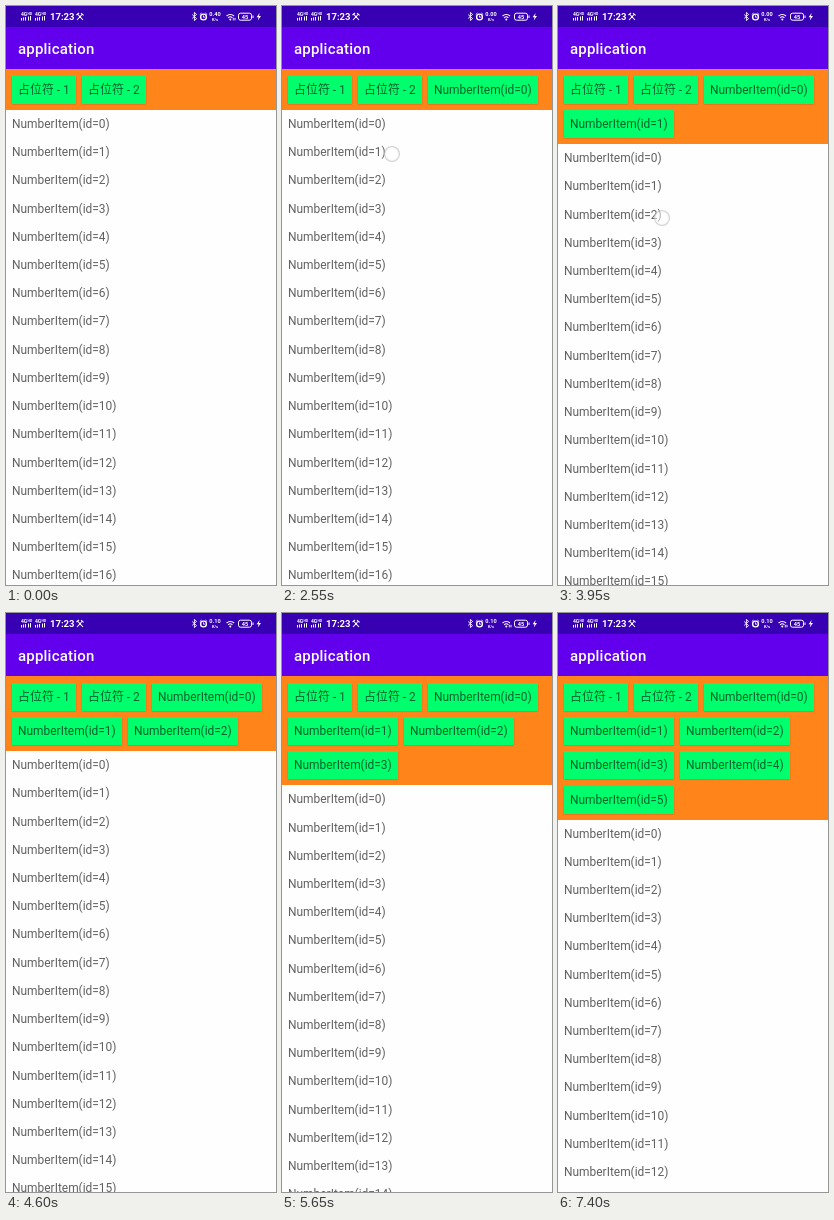
An HTML page that plays this animation: 270x579 px, repeating every 8 s.

```html
<!DOCTYPE html>
<html lang="zh-CN">
<head>
<meta charset="utf-8">
<title>application</title>
<style>
html, body { margin: 0; width: 100%; height: 100%; overflow: hidden; }
#stage {
  position: relative; width: 270px; height: 579px; overflow: hidden;
  background: #ff851b; color: rgba(0, 0, 0, .62);
  font: 11.94px Roboto, "Noto Sans CJK SC", "Noto Sans CJK", sans-serif;
  white-space: nowrap;
}
#status { position: absolute; left: 0; top: 0; }
#bar {
  position: absolute; top: 21px; width: 258px; height: 42.3px; padding-left: 12px;
  background: #6200ee; color: #fff;
  font-size: 15px; font-weight: 500; line-height: 45px; letter-spacing: .0125em;
}
.tag {
  position: absolute; height: 28px; line-height: 28.2px; padding: 0 6px;
  background: #00ff6c; box-shadow: 0 .5px 1.5px rgba(0, 0, 0, .25);
}
#list {
  position: absolute; width: 264px; height: 500px; padding-left: 6px;
  background: #fefefe;
}
#list div { height: 28.23px; line-height: 28.6px; }
.touch {
  position: absolute; width: 14px; height: 14px; margin: -8.5px; opacity: 0;
  border: 1.5px solid rgba(165, 165, 165, .5); border-radius: 50%;
  background: rgba(255, 255, 255, .5);
  box-shadow: inset 0 0 2px rgba(120, 120, 120, .25);
}
</style>
</head>
<body>
<div id="stage">
  <div id="list"></div>
  <div id="bar">application</div>
  <svg id="status" width="270" height="21" fill="#fff" font-family="Roboto, sans-serif">
    <rect width="270" height="21" fill="#3700b3"/>
    <defs>
      <g id="signal">
        <text y="10" font-size="5" font-weight="700">4G</text>
        <text x="6.6" y="8.8" font-size="3.4" font-weight="700">HD</text>
        <path d="M.5 14.5v-2.5M2.5 14.5v-3M4.5 14.5v-3.5M7.5 14.5v-4M9.5 14.5v-4.5" stroke="#fff"/>
      </g>
    </defs>
    <use href="#signal" x="15"/>
    <use href="#signal" x="29"/>
    <text x="44" y="14.2" font-size="9.5" font-weight="700">17:23</text>
    <g fill="none" stroke="#fff">
      <path d="M71 14l5.5-6M77 14l-5.5-6M70.5 9l2.5-2M75 7.2l2.6 2.2" stroke-width="1.1"/>
      <path d="M186.2 8.6l4.4 4-2.2 2V6.4l2.2 2-4.4 4" stroke-width=".9"/>
      <circle cx="197.5" cy="11" r="2.9" stroke-width="1.4"/>
      <path d="M197.5 9.5v1.7h1.4M193.8 8.6l1.8-1.6M201.2 8.6l-1.8-1.6" stroke-width=".9"/>
      <path d="M220.6 10a5.2 5.2 0 0 1 7.4 0M222.2 11.8a3 3 0 0 1 4.2 0" stroke-width="1.1"/>
      <rect x="232.5" y="7.2" width="13" height="7" rx="2"/>
      <path d="M247 9.5v2.5"/>
      <path id="traffic" d="M227.3 14.4v-2.6M229 11.8v2.6" stroke-width=".9"/>
    </g>
    <circle cx="224.3" cy="13.6" r="1"/>
    <g font-weight="700" text-anchor="middle">
      <g id="speeds" font-size="5.6"><text>0.40</text><text>0.00</text><text>0.10</text></g>
      <text x="209" y="14.8" font-size="4">K/s</text>
      <text x="239" y="12.8" font-size="5.6">45</text>
    </g>
    <path d="M253.6 7l-3 4.2h2l-.8 3.4 3.2-4.6h-2z"/>
  </svg>
</div>
<script>
const LOOP = 8000, LINE = 34.2, TAG_TOP = 70, LIST_TOP = 103.9;
const stage = document.getElementById('stage');
const list = document.getElementById('list');

function add(parent, cls, text, x, y) {
  const el = document.createElement('div');
  el.className = cls;
  el.textContent = text;
  if (x !== undefined) Object.assign(el.style, { left: x + 'px', top: y + 'px' });
  return parent.appendChild(el);
}

// keys: [time, value] pairs; the last value holds to the end of the loop
function animate(el, prop, keys, easing) {
  const frames = [...keys, [LOOP, keys[keys.length - 1][1]]]
    .map(([t, v]) => ({ offset: t / LOOP, [prop]: v, easing }));
  el.animate(frames, { duration: LOOP, iterations: Infinity });
}
const hold = (el, prop, keys) => animate(el, prop, keys, 'step-end');
const ease = (el, prop, keys) => animate(el, prop, keys, 'linear');

for (let i = 0; i < 17; i++) add(list, '', `NumberItem(id=${i})`);
add(stage, 'tag', '占位符 - 1', 6, TAG_TOP);
add(stage, 'tag', '占位符 - 2', 76, TAG_TOP);

// press time, end time, touch point, tag column and line
const taps = [
  [1150, 1600, 104, 120, 146, 0],
  [2550, 2900, 110, 148, 6, 1],
  [3850, 4200, 104, 212, 122, 1],
  [4850, 5200, 99, 243, 6, 2],
  [6050, 6400, 100, 302, 122, 2],
  [7100, 7400, 100, 330, 6, 3],
];

const listTops = [[0, LIST_TOP + 'px']];
let lines = 0;
taps.forEach(([press, end, x, y, col, line], id) => {
  const tag = add(stage, 'tag', `NumberItem(id=${id})`, col, TAG_TOP + line * LINE);
  ease(tag, 'opacity', [[0, 0], [end - 180, 0], [end - 10, 1]]);
  if (line > lines) {
    lines = line;
    listTops.push([end - 250, LIST_TOP + line * LINE + 'px']);
  }
});
hold(list, 'top', listTops);

for (const [press, end, x, y] of taps) {
  const dot = add(stage, 'touch', '', x, y);
  ease(dot, 'opacity', [[0, 0], [press - 1, 0], [press, 1], [end - 190, 1], [end - 90, 0]]);
}

// each network speed shows from its own start to the next one's
const starts = [0, 1400, 4600];
[...document.getElementById('speeds').children].forEach((el, i) => {
  el.setAttribute('x', 209);
  el.setAttribute('y', 10);
  hold(el, 'opacity', starts.map((t, j) => [t, i === j ? 1 : 0]));
});
hold(document.getElementById('traffic'), 'opacity', [[0, 1], [1400, 0], [5650, 1]]);
</script>
</body>
</html>
```
